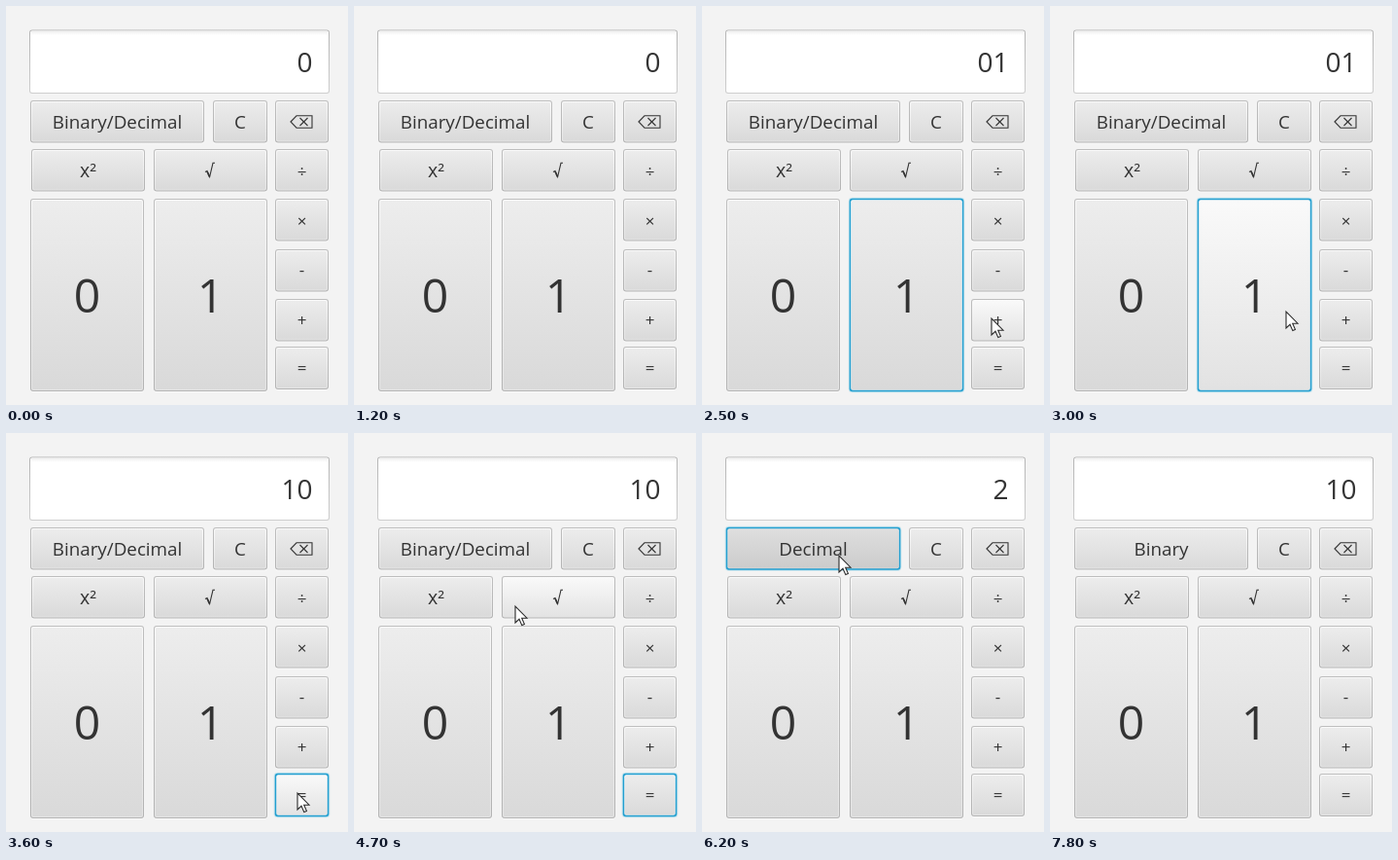
These frames come from a looping animation (352x410 px, 7900 ms). An HTML page with a canvas:

```html
<!DOCTYPE html>
<html lang="en">
<head>
<meta charset="utf-8">
<title>Binary calculator</title>
<style>
  html, body { margin: 0; width: 100%; height: 100%; overflow: hidden; background: #f3f3f3; }
  canvas { display: block; width: 352px; height: 410px; }
</style>
</head>
<body>
<canvas id="stage"></canvas>
<script>
const W = 352, H = 410, LOOP = 7900, STEP = 100;
const FONT = '"Open Sans", "Noto Sans", sans-serif';
const INK = '#333';
const canvas = document.getElementById('stage');
const ctx = canvas.getContext('2d');
const dpr = window.devicePixelRatio || 1;
canvas.width = W * dpr;
canvas.height = H * dpr;

// id, x, y, width, height, font size, text baseline
const buttons = [
  ['mode', 25, 97, 179, 43.5, 18.8, 125.7],
  ['C', 213, 97, 56, 43.5, 18.8, 125.7],
  ['erase', 277, 97, 55, 43.5],
  ['x²', 26, 147, 117, 43.5, 19.5, 176],
  ['root', 152, 147, 117, 43.5],
  ['÷', 277, 147, 55, 43.5, 17, 176],
  ['0', 25, 198, 117, 198, 48, 315],
  ['1', 152, 198, 117, 198, 48, 315],
  ['×', 277, 198, 55, 43.5, 17, 227],
  ['-', 277, 250, 55, 43.5, 17, 277],
  ['+', 277, 301, 55, 43.5, 17, 329],
  ['=', 277, 350, 55, 44, 17, 378]
].map(([id, x, y, w, h, size, base]) => ({ id, x, y, w, h, size, base }));

const FILL = {
  idle: ['#ededed', '#d9d9d9'],
  hover: ['#fafafa', '#e2e2e2'],
  down: ['#dfdfdf', '#cbcbcb']
};

// Times in steps: the result shows when the key is released
const presses = [
  { key: '1', from: 19, to: 21, value: '01' },
  { key: '+', from: 26, to: 27, value: '0' },
  { key: '1', from: 29, to: 30, value: '01' },
  { key: '=', from: 35, to: 36, value: '10' },
  { key: 'mode', from: 50, to: 51, value: '2', mode: 'Decimal' },
  { key: 'mode', from: 62, to: 63, value: '10', mode: 'Binary' }
];
const BLUR = 78;

// step, x, y of the pointer tip
const path = [
  [21, 236, 316], [22, 243, 317], [25, 298, 321], [27, 298, 321],
  [29, 243, 314], [30, 243, 314], [34, 300, 370], [44, 300, 370],
  [47, 166, 178], [49, 141, 126], [67, 141, 126], [68, 247, 199]
];

function pointerAt(step) {
  if (step < path[0][0] || step > path[path.length - 1][0]) return null;
  const i = Math.max(1, path.findIndex(p => p[0] >= step));
  const [a, ax, ay] = path[i - 1], [b, bx, by] = path[i];
  const u = (step - a) / (b - a), k = u * u * (3 - 2 * u);
  return { x: ax + (bx - ax) * k, y: ay + (by - ay) * k };
}

function stateAt(step) {
  const s = { value: '0', mode: 'Binary/Decimal', focus: null, down: null };
  for (const p of presses) {
    if (step < p.from) break;
    s.focus = p.key;
    s.down = step < p.to ? p.key : null;
    if (step >= p.to) {
      s.value = p.value;
      s.mode = p.mode || s.mode;
    }
  }
  if (step >= BLUR) s.focus = null;
  s.pointer = pointerAt(step);
  return s;
}

function box(x, y, w, h, r, fill) {
  ctx.fillStyle = fill;
  ctx.beginPath();
  ctx.roundRect(x, y, w, h, r);
  ctx.fill();
}

function inset(b, d, r, fill) {
  box(b.x + d, b.y + d, b.w - 2 * d, b.h - 2 * d, r, fill);
}

function shade(b, [top, bottom]) {
  const g = ctx.createLinearGradient(0, b.y, 0, b.y + b.h);
  g.addColorStop(0, top);
  g.addColorStop(1, bottom);
  return g;
}

function line(points, close) {
  ctx.beginPath();
  points.forEach(([x, y]) => ctx.lineTo(x, y));
  if (close) ctx.closePath();
}

function text(str, x, y, size, align) {
  ctx.font = `${size}px ${FONT}`;
  ctx.textAlign = align;
  ctx.fillStyle = INK;
  ctx.fillText(str, x, y);
}

function drawErase() {
  ctx.strokeStyle = INK;
  ctx.lineWidth = 1.1;
  line([[293, 119], [299, 112.8], [315, 112.8], [315, 125.2], [299, 125.2]], true);
  ctx.stroke();
  for (const d of [-4, 4]) {
    line([[302.5, 119 - d], [310.5, 119 + d]]);
    ctx.stroke();
  }
}

function drawRoot() {
  ctx.strokeStyle = INK;
  ctx.lineWidth = 1.1;
  line([[205, 170.6], [207, 169.6], [209.6, 175.6], [213, 161.3], [215, 161.3]]);
  ctx.stroke();
  ctx.lineWidth = 1.7;
  line([[207, 170], [209.4, 175.4]]);
  ctx.stroke();
}

function drawButton(b, s) {
  const p = s.pointer;
  const over = p && p.x >= b.x && p.x <= b.x + b.w && p.y >= b.y && p.y <= b.y + b.h;
  const look = s.down === b.id ? 'down' : over ? 'hover' : 'idle';
  if (s.focus === b.id) {
    inset(b, -1.3, 4, 'rgba(3,158,211,0.2)');
    inset(b, -0.3, 3, '#239fd0');
    inset(b, 1.2, 2, shade(b, look === 'down' ? ['#e6e6e6', '#d4d4d4'] : ['#fafafa', '#e8e8e8']));
  } else {
    box(b.x, b.y + 1, b.w, b.h, 3, '#fafafa');
    inset(b, 0, 3, shade(b, ['#bebebe', '#b3b3b3']));
    inset(b, 1, 2, shade(b, ['#fafafa', '#e4e4e4']));
  }
  inset(b, 2, 1.5, shade(b, FILL[look]));

  if (b.id === 'erase') drawErase();
  else if (b.id === 'root') drawRoot();
  else text(b.id === 'mode' ? s.mode : b.id, b.x + b.w / 2, b.base, b.size, 'center');
}

function drawDisplay(value) {
  const d = { x: 24, y: 24.5, w: 309, h: 65.5 };
  inset(d, 0, 3, shade(d, ['#b4b4b4', '#cecece']));
  inset(d, 1, 2, '#fff');
  const g = ctx.createLinearGradient(0, 25, 0, 30);
  g.addColorStop(0, '#ececec');
  g.addColorStop(1, '#fff');
  box(25, 25.5, 307, 5, 2, g);
  text(value, 315.4, 68.3, 28, 'right');
}

function drawPointer({ x, y }) {
  ctx.save();
  ctx.translate(x, y);
  line([[0, 0], [0, 17], [4, 13.3], [6.8, 19.6], [9.4, 18.4], [6.7, 12.3], [12, 12.2]], true);
  ctx.fillStyle = '#fff';
  ctx.fill();
  ctx.strokeStyle = '#2b2b2b';
  ctx.lineWidth = 1.1;
  ctx.stroke();
  ctx.restore();
}

function draw(now) {
  const s = stateAt(Math.floor((now % LOOP) / STEP));
  ctx.setTransform(dpr, 0, 0, dpr, 0, 0);
  ctx.fillStyle = '#f3f3f3';
  ctx.fillRect(0, 0, W, H);
  drawDisplay(s.value);
  buttons.forEach(b => drawButton(b, s));
  if (s.pointer) drawPointer(s.pointer);
}

const start = performance.now();
function tick() {
  draw(performance.now() - start);
  requestAnimationFrame(tick);
}
tick();
</script>
</body>
</html>
```
